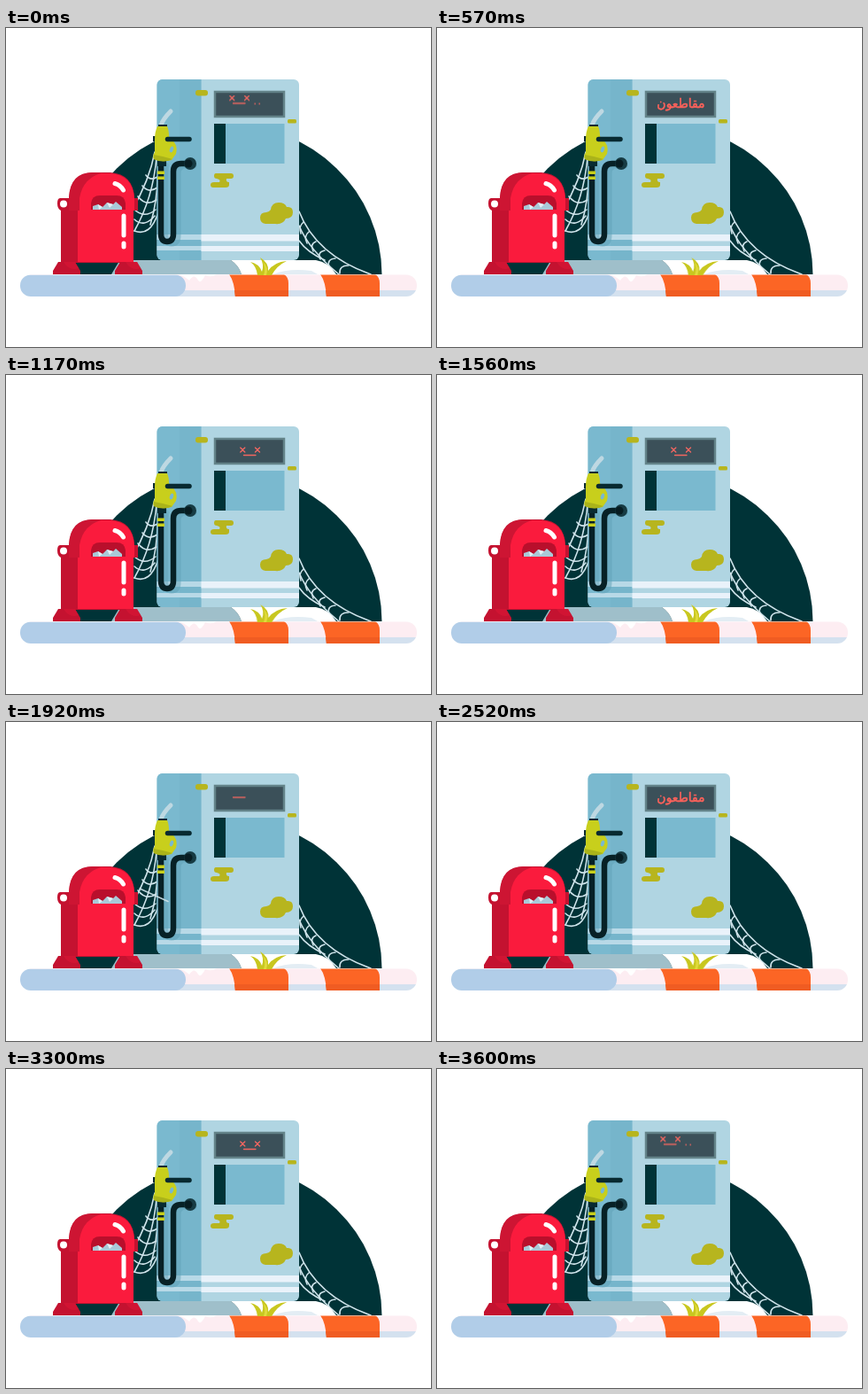
Write an HTML page that moves like this. It is 480 px wide and 360 px high and loops after 3.63 s.

```html
<!DOCTYPE html>
<html lang="ar">
<head>
<meta charset="utf-8">
<style>
html, body { margin: 0; width: 100%; height: 100%; overflow: hidden; background: #fff; }
svg { display: block; width: 480px; height: 360px; }
.ink { fill: #003337; }
.rust { fill: #b7b51e; }
.line { fill: none; stroke-linecap: round; stroke-linejoin: round; }
.web { stroke: #cfe3ea; stroke-width: 1.6; }
.word { font: 14px "DejaVu Sans", sans-serif; fill: #ff625b; stroke: #ff625b; stroke-width: .5; text-anchor: middle; direction: rtl; }
.glow { stroke: #f46761; stroke-width: 1.3; }
.word, .face, .eyes, .dots { animation: 1815ms step-end infinite; }
.word { animation-name: word; }
.face { animation-name: face; }
.eyes { animation-name: eyes; }
.dots { animation-name: dots; }
.thread { animation: thread 3630ms step-end infinite; }
.grass { transform-origin: 291px 279px; animation: sway 1815ms ease-in-out infinite; }
@keyframes word {
  0%, 100% { opacity: 0; transform: none; }
  11% { opacity: 1; transform: translateX(-3px); }
  13% { opacity: .35; transform: translateX(2px); }
  15% { opacity: 1; transform: none; }
  53% { opacity: .5; transform: translateX(3px); }
  55% { opacity: 0; }
}
@keyframes face {
  0%, 100% { opacity: 1; transform: translate(-12px, -5.5px); }
  9% { opacity: 0; }
  55% { opacity: 1; transform: translateX(4px); }
  57% { opacity: 1; transform: none; }
  94% { opacity: 1; transform: translate(-6px, -3px); }
  97% { opacity: 1; transform: translate(-12px, -5.5px); }
}
@keyframes eyes {
  0%, 100% { opacity: 1; }
  4% { opacity: 0; }
  55% { opacity: 1; }
}
@keyframes dots {
  0%, 100% { opacity: 1; }
  4% { opacity: 0; }
  97% { opacity: 1; }
}
@keyframes thread {
  0%, 100% { opacity: 0; }
  51.5% { opacity: .9; }
  54.5% { opacity: 0; }
}
@keyframes sway {
  0%, 100% { transform: none; }
  45% { transform: skewX(-2deg) scaleX(1.03); }
}
</style>
</head>
<body>
<svg viewBox="0 0 480 360">
  <defs>
    <path id="hill" d="M74 278A175.250 169.500 0 0 1 424.500 278Z"/>
    <clipPath id="dome"><use href="#hill"/></clipPath>
    <clipPath id="body"><rect x="170.500" y="58" width="160.500" height="204" rx="6"/></clipPath>
    <clipPath id="curb"><rect x="16" y="278.500" width="448" height="24.500" rx="12"/></clipPath>
    <path id="hose" d="M175 153V232Q175 241 182 241T189 232V162Q189 153 198 153H207"/>
  </defs>

  <use href="#hill" class="ink"/>

  <g class="line web" clip-path="url(#dome)">
    <path d="M168 140Q162 172 142 206M170 146Q166 192 145 229M171 168Q171 195 163 222"/>
    <path d="M158 166Q163 173 171 168M154 178Q161 187 171 180M149 190Q158 202 170 194M144 204Q156 216 169 205M145 216Q156 226 168 212M145 229Q163 236 172 208"/>
    <path d="M331 207Q350 256 412 278M331 223Q342 250 376 278M331 240Q340 253 360 262"/>
    <path d="M336 219Q330 224 333 232M342 230Q336 235 340 243M350 241Q343 244 347 252M360 251Q351 253 355 261M372 260Q362 261 365 269M387 268Q376 268 377 277"/>
  </g>

  <path fill="#9fbfca" d="M119 278L128 263Q130 262 133 262H254Q263 268 266 278Z"/>
  <path fill="#fff" d="M254 262H350Q364 264 373 278H266Q263 268 254 262Z"/>
  <path fill="#e3edf4" d="M302 278Q318 271 345 274L352 278Z"/>

  <g clip-path="url(#body)">
    <path fill="#b0d5e2" d="M170 58H331V262H170Z"/>
    <path fill="#7ab9cf" d="M170 58H220.500V262H170Z"/>
    <path fill="#6dabc3" d="M196 58H220.500V262H196Z" opacity=".35"/>
    <path fill="#b8d9e7" d="M170 233H221V239H170ZM170 246H221V251H170Z"/>
    <path fill="#e9f2fa" d="M220.500 233H331V240.500H220.500ZM220.500 246H331V252H220.500Z"/>
  </g>

  <rect x="236" y="72" width="78" height="28" fill="#3b5059" stroke="#638389" stroke-width="2.500"/>
  <path fill="#7ab9cf" d="M247 108H314.500V153H247Z"/>
  <path class="ink" d="M235 108H248V153H235Z"/>

  <g class="face line glow">
    <path class="eyes" d="M264.800 82L269.800 87M269.800 82L264.800 87M281.500 82L286.500 87M286.500 82L281.500 87"/>
    <path d="M268.500 90.500H282"/>
    <path class="dots" d="M293 91H293.500M298 91H298.500"/>
  </g>
  <text class="word" x="275.500" y="89.500">مقاطعون</text>

  <g class="rust">
    <rect x="214" y="70" width="14" height="6.500" rx="3"/>
    <rect x="318" y="103" width="10" height="4.500" rx="1.500"/>
    <path d="M237 164H254Q257 164 257 167T254 170H249Q248 174 252 174V177Q252 180 248 180H234Q231 180 231 177T235 174H241Q243 171 238 170Q235 170 235 167T237 164Z"/>
    <path d="M299 205Q300 197 308 197Q315 197 317 202Q324 201 324 208Q324 215 316 215Q313 222 304 221H293Q287 220 287 214T294 208Q297 208 299 205Z"/>
  </g>

  <use href="#hose" class="line" stroke="#5f9fb6" stroke-width="7" opacity=".5" transform="translate(5 2)"/>
  <use href="#hose" class="line" stroke="#072126" stroke-width="6.500"/>
  <circle cx="208" cy="153" r="7" fill="#173b43"/>
  <circle cx="206" cy="153" r="4.500" fill="#071d22"/>
  <path fill="#c8cf1c" d="M171 161.500H179V165H171ZM171 167.500H179V171H171Z"/>

  <path class="line" stroke="#bed8e2" stroke-width="5" d="M175 110Q177 103 186 94"/>
  <path fill="#082a31" d="M166 122H169V128H166ZM172 109H182V113H172ZM171 148H181V156H171Z"/>
  <path fill="#c8cf1c" d="M171 111H182Q184 115 184 122L190 129Q194 134 192 142L187 149Q177 152 167 148Q165 145 168 140V126Q168 117 171 111Z"/>
  <path fill="#aab31a" d="M167 143Q179 145 188 148Q177 153 167 148Z"/>
  <ellipse cx="187" cy="137" rx="2" ry="3.500" fill="#7ab9cf" transform="rotate(20 187 137)"/>
  <path class="line" stroke="#082a31" stroke-width="5.500" d="M182.500 125.500H207"/>
  <path class="line web thread" d="M151 188L183 202.500"/>

  <g clip-path="url(#curb)">
    <path fill="#fdedf2" d="M16 278H464V304H16Z"/>
    <path fill="#d4e1ef" d="M190 296H464V304H190Z"/>
    <g id="stripe">
      <path fill="#fc6525" d="M252 278H314Q319 281 319 288V304H259Q258 286 252 278Z"/>
      <path fill="#f05c22" d="M258 296H319V304H259Z"/>
    </g>
    <use href="#stripe" x="103"/>
    <rect x="0" y="278.500" width="203" height="24.500" rx="12" fill="#b1cde8"/>
    <path fill="#fff" d="M194 278H238Q232 282 225 279Q219 291 216 283Q212 277 207 285Q202 280 194 278Z"/>
  </g>

  <g class="grass">
    <path fill="#c8c71f" d="M284 279Q283 269 276 264Q286 266 289 275Q292 267 287 259Q297 265 296 274Q303 264 317 263Q306 268 300 279Z"/>
    <path fill="#e2dc3e" d="M291 279Q294 270 290 264Q297 270 294 279Z"/>
  </g>

  <g fill="#c41230">
    <path d="M62 204H77V266H62Z"/>
    <path d="M61 192H76V206H62Q58 204 58 198Q58 192 61 192Z"/>
    <circle cx="65" cy="198.500" r="4" fill="#fff"/>
    <path d="M71 206V192Q72 163 98 163H118Q144 165 145 192H149V206H143V265H74V206Z"/>
  </g>
  <path fill="#fa1b3d" d="M81 206V191Q83 164 108 164H118Q143 166 145 192V206H144V264H81Z"/>
  <path fill="#cd1533" d="M71 192Q73 164 98 163H111Q87 168 83 192V206H71Z"/>
  <path fill="#b90f2c" d="M96 206V198Q97 189 106 189H125Q134 189 135 198V206Z"/>
  <path fill="#a9c9d8" d="M98 205V201L104 199L109 202L114 197L121 199L124 196L131 202V205Z"/>
  <path fill="#e4f0f5" d="M104 199L109 202L105 205ZM114 197L121 199L117 203Z"/>
  <path fill="#fa1b3d" d="M91 205H140V210H91Z"/>
  <g class="line" stroke="#fff" stroke-width="5">
    <path d="M123 175.500Q129 177 132.500 183"/>
    <path d="M133 212V234M133 243V247"/>
  </g>
  <g id="foot">
    <path fill="#c41230" d="M59 264H78L84 274V278H53V274Z"/>
    <path fill="#e31837" d="M65 264H78L82 271Q72 275 65 264Z" opacity=".45"/>
  </g>
  <use href="#foot" x="70"/>
</svg>
</body>
</html>
```
